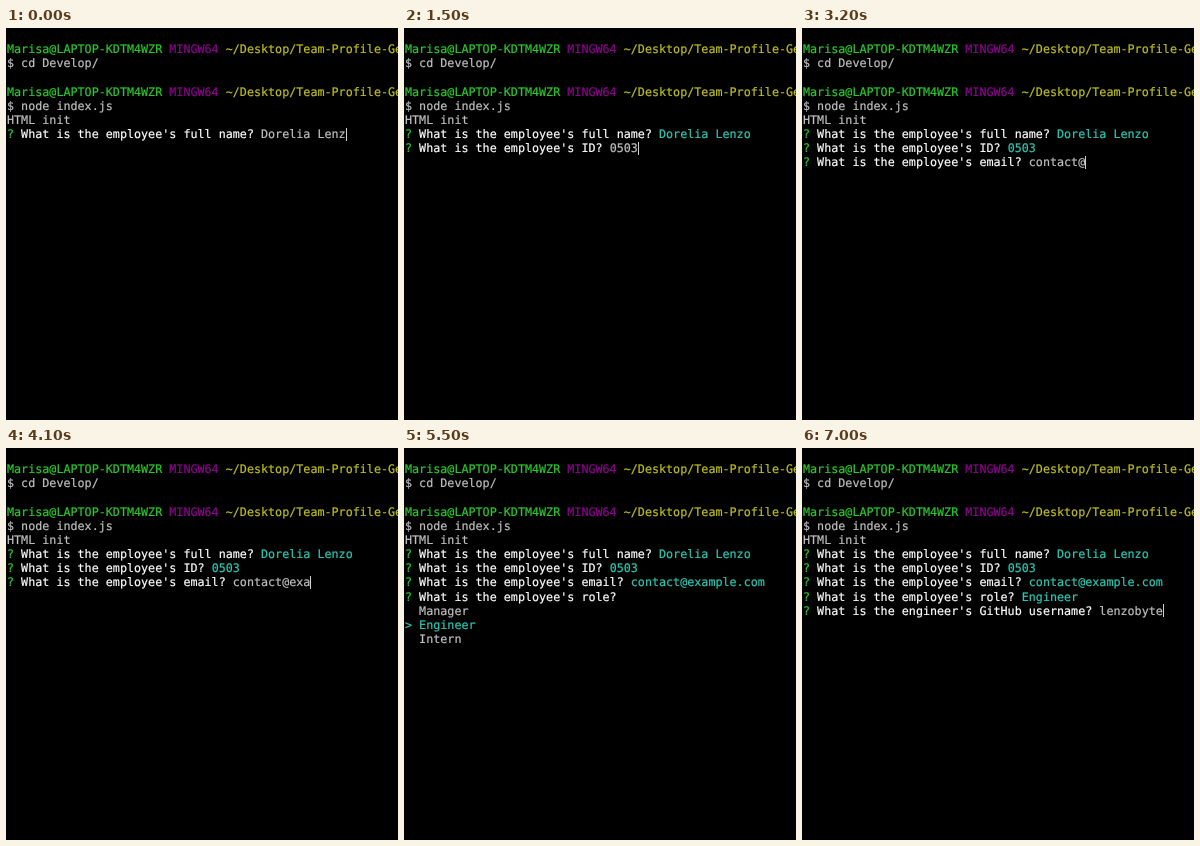
Write an HTML page that moves like this. It is 392x392 px and loops after 7.1 s.

```html
<!DOCTYPE html>
<html lang="en">
<head>
<meta charset="utf-8">
<title>Team profile prompt</title>
<style>
html, body { margin: 0; width: 100%; height: 100%; overflow: hidden; background: #000; }
#term {
  position: absolute; inset: 0; box-sizing: border-box; padding: 14.2px 0 0 1px;
  overflow: hidden; contain: strict; white-space: pre;
  font: 11.72px/14.17px "DejaVu Sans Mono", "Liberation Mono", monospace;
  text-rendering: geometricPrecision; font-variant-ligatures: none;
  -webkit-text-stroke: .2px; color: #bfbfbf;
}
#term div { height: 14.17px; }
.g { color: #2acb2a; }
.m { color: #8e0090; }
.y { color: #bfbf1c; }
.c { color: #2ac8b4; }
.w { color: #fff; }
.cur { display: inline-block; width: 1px; height: 13px; margin-right: -1px; vertical-align: -2.5px; background: #d0d0d0; }
</style>
</head>
<body>
<div id="term"></div>
<script>
const LOOP = 7100;
const term = document.getElementById('term');
const span = (cls, text) => `<span class="${cls}">${text}</span>`;
const cursor = span('cur', '');

const prompt = span('g', 'Marisa@LAPTOP-KDTM4WZR') + ' ' + span('m', 'MINGW64') + ' ' +
  span('y', '~/Desktop/Team-Profile-Ge');
const head = [prompt, '$ cd Develop/', '', prompt, '$ node index.js', 'HTML init'];

// A burst types its text from a start time at one key per step
const burst = (text, start, step) => ({ text, start, step });
const typed = (b, t) => b.text.slice(0, Math.max(0, Math.floor((t - b.start) / b.step) + 1));

const fields = [
  { ask: "employee's full name", enter: 400, bursts: [burst('Dorelia Lenzo', -1100, 100)] },
  { ask: "employee's ID", enter: 1600, bursts: [burst('0503', 1100, 100)] },
  { ask: "employee's email", enter: 4900,
    bursts: [burst('contact', 2200, 116), burst('@ex', 3200, 300), burst('ample.com', 4100, 80)] },
  { ask: "employee's role", enter: 5700, menu: ['Manager', 'Engineer', 'Intern'], down: 5300 },
  { ask: "engineer's GitHub username", enter: LOOP, caret: 6100,
    bursts: [burst('lenzobyte', 6300, 85)] }
];

function menuRows(f, t, ask) {
  const pick = t < f.down ? 0 : 1;
  if (t >= f.enter) return [ask + span('c', f.menu[pick])];
  const items = f.menu.map((name, i) => i === pick ? span('c', '&gt; ' + name) : '  ' + name);
  return [ask + (pick ? '' : '(Use arrow keys)'), ...items];
}

function fieldRows(f, t) {
  const ask = span('g', '?') + span('w', ` What is the ${f.ask}? `);
  if (f.menu) return menuRows(f, t, ask);
  const text = f.bursts.map(b => typed(b, t)).join('');
  if (t >= f.enter) return [ask + span('c', text)];
  return [ask + text + (t >= (f.caret || 0) ? cursor : '')];
}

let shown = '';
function draw(t) {
  const open = fields.filter((f, i) => i === 0 || t >= fields[i - 1].enter);
  const rows = head.concat(...open.map(f => fieldRows(f, t)));
  const html = rows.map(r => `<div>${r}</div>`).join('');
  if (html !== shown) term.innerHTML = shown = html;
}

const start = performance.now();
function tick() {
  draw((performance.now() - start) % LOOP);
  requestAnimationFrame(tick);
}
tick();
</script>
</body>
</html>
```
